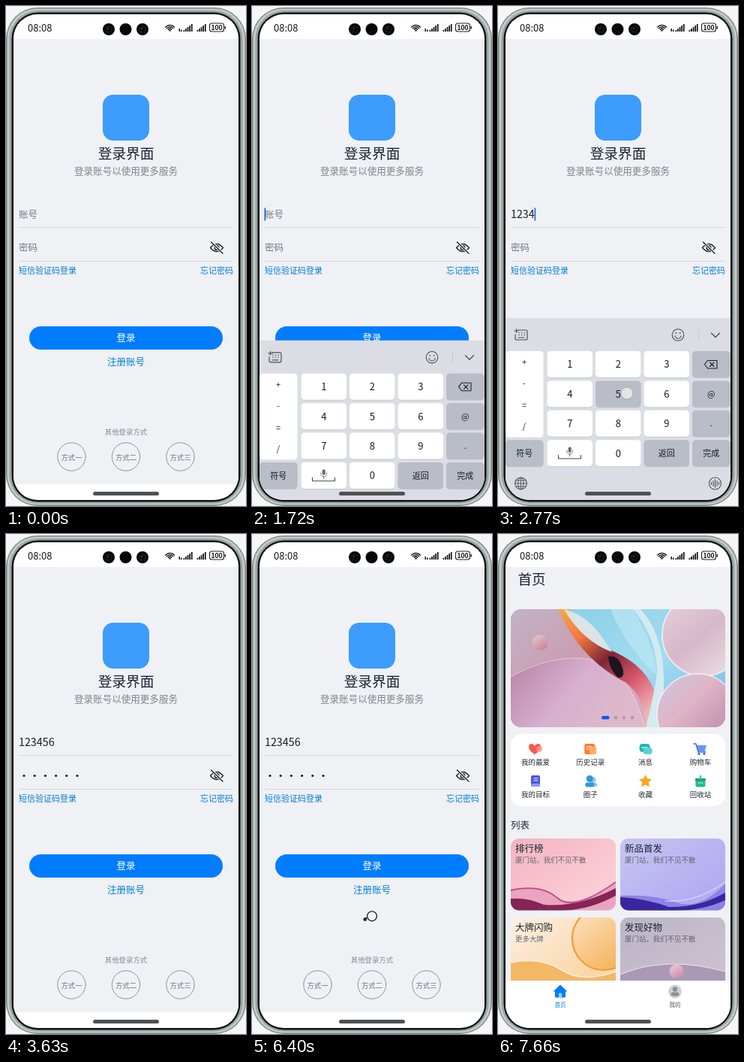
Write an HTML page with a canvas that moves like this. It is 320x665 px and loops after 8000 ms.

```html
<!DOCTYPE html>
<html lang="zh-CN">
<head>
<meta charset="utf-8">
<style>
html, body { margin: 0; width: 100%; height: 100%; overflow: hidden; background: #f5f5f7; }
canvas { display: block; width: 320px; height: 665px; }
</style>
</head>
<body>
<canvas id="stage"></canvas>
<script>
const canvas = document.getElementById('stage');
const ctx = canvas.getContext('2d');
const dpr = window.devicePixelRatio || 1;
canvas.width = 320 * dpr;
canvas.height = 665 * dpr;

const LOOP = 8000;
const FONT = '"Noto Sans CJK SC", "Noto Sans SC", "Noto Sans CJK JP", "Noto Sans", sans-serif';
const PAGE = '#eff1f5', INK = '#182431', BLUE = '#007dff', KEY_GREY = '#b9bdc7';
const TAU = Math.PI * 2;

const clamp01 = v => Math.min(1, Math.max(0, v));
const easeOut = p => 1 - (1 - p) ** 3;

function text(str, x, y, size, color = INK, { align = 'left', weight = 400 } = {}) {
  ctx.font = `${weight} ${size}px ${FONT}`;
  ctx.textAlign = align;
  ctx.textBaseline = 'alphabetic';
  ctx.fillStyle = color;
  ctx.fillText(str, x, y + size * 0.375);
}
const centered = (str, x, y, size, color, weight) => text(str, x, y, size, color, { align: 'center', weight });

function box(x, y, w, h, r, fill) {
  ctx.beginPath();
  ctx.roundRect(x, y, w, h, r);
  ctx.fillStyle = fill;
  ctx.fill();
}
function disc(x, y, r, fill) {
  ctx.beginPath();
  ctx.arc(x, y, r, 0, TAU);
  ctx.fillStyle = fill;
  ctx.fill();
}
function ring(x, y, r, color, width = 1, from = 0, to = TAU) {
  ctx.beginPath();
  ctx.arc(x, y, r, from, to);
  ctx.strokeStyle = color;
  ctx.lineWidth = width;
  ctx.stroke();
}
function stroke(path, color, width = 1) {
  ctx.strokeStyle = color;
  ctx.lineWidth = width;
  ctx.stroke(new Path2D(path));
}
function shape(path, fill) {
  ctx.fillStyle = fill;
  ctx.fill(new Path2D(path));
}
function linear(x0, y0, x1, y1, ...colors) {
  const g = ctx.createLinearGradient(x0, y0, x1, y1);
  colors.forEach((c, i) => g.addColorStop(i / (colors.length - 1), c));
  return g;
}
function clipped(x, y, w, h, r, draw) {
  ctx.save();
  ctx.beginPath();
  ctx.roundRect(x, y, w, h, r);
  ctx.clip();
  draw();
  ctx.restore();
}

function phoneBody() {
  ctx.fillStyle = '#f5f5f7';
  ctx.fillRect(0, 0, 320, 665);
  box(0, 2, 320, 663, 42, '#7d8988');
  box(1.5, 3.5, 317, 660, 40, '#c0cbca');
  box(4.5, 6, 311, 655.5, 38, '#98a4a3');
  box(7.5, 8.5, 305, 651, 35, '#111415');
}

function statusBar() {
  text('08:08', 29, 29, 13, '#111', { weight: 500 });
  for (const x of [137, 159.5, 182]) disc(x, 31, 8, '#050608');
  for (const x of [137, 182]) {
    ring(x, 31, 4, '#22282e', 1);
    disc(x - 1, 30, 1.1, '#3c4a58');
  }
  for (const r of [2.8, 5.2, 7.6]) ring(218.5, 33, r, '#111', 1.4, -Math.PI * 0.78, -Math.PI * 0.22);
  disc(218.5, 32.6, 1.2, '#111');
  ctx.fillStyle = '#111';
  ctx.fillRect(230.5, 30, 1.5, 4);
  ctx.fillRect(233, 31.5, 1.5, 2.5);
  for (let i = 0; i < 5; i++) {
    const h = 2 + i * 2;
    ctx.fillRect(236.5 + i * 2.6, 34 - h, 1.7, h);
    ctx.fillRect(254.5 + i * 2.6, 34 - h, 1.7, h);
  }
  ctx.beginPath();
  ctx.roundRect(271.5, 23, 19, 11, 3);
  ctx.strokeStyle = '#222';
  ctx.lineWidth = 1.1;
  ctx.stroke();
  ctx.fillStyle = '#222';
  ctx.fillRect(291.5, 27, 1.5, 3.5);
  centered('100', 281, 28.6, 8.6, '#111', 700);
}

function eyeIcon() {
  stroke('M272.5 321.5Q281 311.5 289.5 321.5Q281 331.5 272.5 321.5Z', '#222', 1.3);
  ring(281, 321.5, 2.8, '#222', 1.5);
  stroke('M274.5 314.5L288.5 328.5', PAGE, 3.4);
  stroke('M273.5 314L289 329', '#222', 1.4);
}

function caret(x) {
  ctx.fillStyle = '#1668e3';
  ctx.fillRect(x, 268.5, 1.7, 17);
}

function touchDot(x, y) {
  disc(x, y, 8, 'rgba(235,235,238,.85)');
  ring(x, y, 8, 'rgba(125,128,135,.6)', 0.8);
}

function loader(t) {
  const cx = 160, cy = 508.3, tilt = -0.43;
  const phase = (t - 6400) / 1200;
  const comet = front => {
    for (let i = 16; i >= 0; i--) {
      const a = TAU * (phase - i * 0.008);
      if ((Math.sin(a) >= 0) !== front) continue;
      const u = -Math.cos(a) * 10.2, v = Math.sin(a) * 1.2;
      disc(cx + u * Math.cos(tilt) - v * Math.sin(tilt),
           cy + u * Math.sin(tilt) + v * Math.cos(tilt), 2.2 - i * 0.1, '#2c2e31');
    }
  };
  comet(false);
  disc(cx, cy, 6.4, PAGE);
  ring(cx, cy, 6.4, '#2c2e31', 1.4);
  comet(true);
}

function loginPage(t) {
  const typed = '123456'.slice(0, Math.max(0, Math.floor((t - 2240) / 130)));
  const hasPassword = t >= 3230;

  box(129, 118, 62, 61, 14, '#3c9cfc');
  centered('登录界面', 160, 195.5, 18.7, INK, 500);
  centered('登录账号以使用更多服务', 160, 219.5, 12.55, '#7f848b');

  if (typed) text(typed, 17, 277, 14.3, '#171c22');
  else text('账号', 17, 277, 12.5, '#74787e');
  if (t >= 1700 && t < 3230) caret(typed ? 17 + typed.length * 7.95 - 0.3 : 16.5);

  ctx.fillStyle = '#d4d7db';
  ctx.fillRect(17, 294, 286, 1);
  ctx.fillRect(17, 339, 286, 1);

  if (hasPassword) for (let i = 0; i < 6; i++) disc(24 + i * 14.2, 321.5, 1.6, '#171c22');
  else text('密码', 17, 321.5, 12.5, '#74787e');
  eyeIcon();

  text('短信验证码登录', 17, 352, 11, '#007dd9', { weight: 500 });
  text('忘记密码', 303, 352, 11, '#007dd9', { align: 'right', weight: 500 });

  const pressed = t >= 4290 && t < 4420;
  box(31, 426, 258, 31, 15.5, pressed ? '#0071e6' : BLUE);
  centered('登录', 160, 441.5, 12.5, '#fff', 500);
  centered('注册账号', 160, 473, 12.5, '#007dd9', 500);

  centered('其他登录方式', 160, 566, 9.4, '#85898f');
  ['一', '二', '三'].forEach((n, i) => {
    const x = 87.5 + i * 72.5;
    ring(x, 599.5, 18.7, '#85888c', 0.9);
    centered('方式' + n, x, 600, 9.4, '#6d7176');
  });

  if (t >= 4490) loader(t);
  if (t >= 1390 && t < 1520) touchDot(92, 277);
  if (pressed) touchDot(172, 444);
}

const columns = [10, 65.5, 130, 194.5, 259];
const rowY = row => 459 + row * 39.4;

function key(col, row, label, { grey = false, size = 13 } = {}) {
  const x = columns[col], w = col % 4 ? 60.5 : 50.5, y = rowY(row);
  box(x, y + 1, w, 35, 4.5, '#c3c6ce');
  box(x, y, w, 35, 4.5, grey ? KEY_GREY : '#fff');
  if (label) centered(label, x + w / 2, y + 17.5, size, '#15181c', 500);
}

function keyboardIcons() {
  const c = '#4b4f56';
  stroke('M27 431H37Q39 431 39 433V442Q39 444 37 444H25Q23 444 23 442V437M22 432H27M24.5 429.5V434.5', c, 1.2);
  for (let i = 0; i < 6; i++) disc(28 + (i % 3) * 3.6, 434.5 + Math.floor(i / 3) * 3, 0.8, c);
  stroke('M27 441H35', c, 1.2);
  ring(240, 437.5, 7.8, c, 1.1);
  ring(240, 438, 4.2, c, 1.1, 0.2, Math.PI - 0.2);
  disc(237.3, 435, 0.9, c);
  disc(242.7, 435, 0.9, c);
  stroke('M267.5 430V445', '#c6c9d0', 1);
  stroke('M284.5 435L290 440.5L295.5 435', c, 1.3);

  stroke('M275.5 476.5L279.5 471.5H292V482H279.5ZM282.5 474L288 479.5M288 474L282.5 479.5', '#1d2024', 1.1);
  box(93.7, 586.5, 4, 7.5, 2, '#65696f');
  stroke('M91.7 591Q92 596 95.7 596Q99.4 596 99.7 591M95.7 596V599', '#65696f', 0.9);
  stroke('M80.5 597.5V602H110.5V597.5', '#44484e', 1.1);

  ring(30.5, 635, 7.8, c, 1.1);
  stroke('M22.7 635H38.3M24 631H37M24 639H37M30.5 627V643', c, 0.9);
  ctx.beginPath();
  ctx.ellipse(30.5, 635, 3.7, 7.8, 0, 0, TAU);
  ctx.stroke();
  ring(289.5, 635, 8, c, 1.1);
  stroke('M284.5 633.5V636.5M287 631.5V638.5M289.5 629.5V640.5M292 631.5V638.5M294.5 633.5V636.5', c, 1.1);
}

function keyboard(t) {
  const shown = easeOut(clamp01((t - 1520) / 400));
  const hidden = clamp01((t - 3230) / 350) ** 1.5;
  const offset = 242 * (1 - shown + hidden);
  if (offset >= 242) return;
  const beat = (t - 2240) / 130;
  const active = beat >= 0 && beat < 6 && beat % 1 < 0.85 ? Math.floor(beat) + 1 : 0;

  ctx.save();
  ctx.translate(0, offset);
  ctx.fillStyle = '#dcdde4';
  ctx.fillRect(10, 415, 300, 250);
  box(10, 459, 50.5, 114.5, 4.5, '#fff');
  ['+', '-', '=', '/'].forEach((s, i) => centered(s, 35, 474 + i * 28.3, 11, '#15181c', 500));
  for (let n = 1; n <= 9; n++) {
    key(1 + (n - 1) % 3, Math.floor((n - 1) / 3), String(n), { grey: n === active });
  }
  ['', '@', '.'].forEach((s, row) => key(4, row, s, { grey: true, size: 11 }));
  key(0, 3, '符号', { grey: true, size: 11 });
  key(1, 3, '');
  key(2, 3, '0');
  key(3, 3, '返回', { grey: true, size: 11 });
  key(4, 3, '完成', { grey: true, size: 11 });
  keyboardIcons();
  if (active) touchDot(columns[1 + (active - 1) % 3] + 42, rowY(Math.floor((active - 1) / 3)) + 16.5);
  ctx.restore();
}

function banner() {
  clipped(17, 100, 286, 157, 14, () => {
    ctx.fillStyle = linear(140, 100, 260, 257, '#8fd3ea', '#a4dcf0', '#79bfe4');
    ctx.fillRect(17, 100, 286, 157);
    shape('M17 100H86Q110 150 165 178Q215 205 212 257H17Z', linear(17, 100, 150, 257, '#c3b3c5', '#cb9db3', '#d5a9c3'));
    shape('M17 190Q70 160 120 166Q175 176 196 257H17Z', linear(40, 165, 150, 257, '#bd8cad', '#d6b0cf', '#dfb9c9'));
    stroke('M17 190Q70 160 120 166Q175 176 196 257', 'rgba(255,235,245,.5)', 1);
    shape('M80 100H96Q118 142 158 158Q200 178 210 214Q206 236 196 257Q196 208 160 192Q106 160 80 100Z',
      linear(85, 100, 200, 235, '#f7a74c', '#f2773f', '#7c2634', '#d8576d', '#efb4b5'));
    shape('M147 163Q160 160 166 178Q170 192 160 191Q148 180 147 163Z', '#1e1420');
    shape('M88 100Q114 106 135 132Q146 148 152 157Q112 142 88 100Z', '#dbe4e7');
    shape('M150 100H180Q208 146 212 188Q170 150 150 100Z', 'rgba(190,232,244,.65)');
    shape('M180 100Q213 140 212 186Q206 224 197 257H214Q226 205 218 160Q210 120 190 100Z', '#d3eaf1');
    disc(274, 134, 55, linear(225, 95, 300, 190, '#e3cdd8', '#d7b8c8', '#eadbe0'));
    ring(274, 134, 55, 'rgba(255,255,255,.75)', 1.5);
    disc(266, 240, 54, linear(225, 190, 290, 257, '#cfc3dc', '#dfb5c6', '#c797b4'));
    ring(266, 240, 54, 'rgba(255,245,250,.8)', 1.5);
    disc(56, 144.5, 10.5, linear(48, 135, 62, 156, '#e7c5cf', '#c68093'));
  });
  box(138, 242, 10.5, 4.5, 2.3, '#0a59f7');
  for (const x of [157, 168, 179]) disc(x, 244.3, 2.3, 'rgba(90,95,115,.35)');
}

const icons = [
  (x, y) => {
    shape(`M${x - 1} ${y + 7}C${x - 16} ${y - 2} ${x - 6} ${y - 12} ${x - 1} ${y - 4}C${x + 5} ${y - 12} ${x + 14} ${y - 2} ${x - 1} ${y + 7}Z`, '#fa5a50');
    disc(x + 5, y, 4, 'rgba(255,150,135,.8)');
  },
  (x, y) => {
    box(x - 8, y - 7, 14, 14, 2.5, '#fb7d37');
    box(x - 1, y - 3, 9, 10, 2, '#ffad6b');
    stroke(`M${x - 5} ${y - 3}H${x + 1}M${x - 5} ${y}H${x - 2}`, '#fff', 1.2);
  },
  (x, y) => {
    box(x - 8, y - 7, 14, 11, 4, '#25b6bd');
    box(x - 3, y - 2, 12, 9, 4, '#5fd0d2');
    stroke(`M${x - 5} ${y - 2}H${x + 2}`, '#fff', 1.1);
  },
  (x, y) => {
    shape(`M${x - 5} ${y - 5}H${x + 8}L${x + 6} ${y + 3}H${x - 3}Z`, '#6c95f5');
    stroke(`M${x - 9} ${y - 7}H${x - 6}L${x - 3} ${y + 4}H${x + 7}`, '#4268e0', 1.4);
    disc(x - 2, y + 6.5, 1.6, '#4268e0');
    disc(x + 5, y + 6.5, 1.6, '#4268e0');
  },
  (x, y) => {
    box(x - 6, y - 8, 12, 15, 2, '#4a55e4');
    box(x - 6, y + 3, 12, 4, 2, '#8f97f7');
    stroke(`M${x - 2} ${y - 4}H${x + 3}M${x - 2} ${y - 1}H${x + 3}`, '#fff', 1.2);
  },
  (x, y) => {
    disc(x + 3, y - 2, 4, '#8cc8ee');
    box(x - 1, y + 2, 10, 5, 2.5, '#8cc8ee');
    disc(x - 1, y - 3.5, 4.5, '#2f97dc');
    box(x - 7, y + 1.5, 12, 6, 3, '#2f97dc');
  },
  (x, y) => {
    ctx.beginPath();
    for (let i = 0; i < 10; i++) {
      const a = i * TAU / 10 - Math.PI / 2, r = i % 2 ? 4.4 : 9;
      ctx.lineTo(x + r * Math.cos(a), y + r * Math.sin(a));
    }
    ctx.closePath();
    ctx.fillStyle = '#fba614';
    ctx.fill();
  },
  (x, y) => {
    box(x - 6.5, y - 2, 13, 9.5, 2, '#27ba90');
    box(x - 7, y - 4, 14, 3.5, 1, '#1a9d79');
    box(x - 1.2, y - 8, 2.4, 6, 1, '#35c99f');
    stroke(`M${x - 3} ${y + 2}H${x + 3}`, '#c9f4e5', 1.2);
  }
];
const labels = ['我的最爱', '历史记录', '消息', '购物车', '我的目标', '圈子', '收藏', '回收站'];

function menu() {
  box(17, 266, 286, 96, 15, '#fff');
  labels.forEach((label, i) => {
    const x = 50 + (i % 4) * 73.3, y = i < 4 ? 286 : 329;
    icons[i](x, y);
    centered(label, x, y + 17, 9.5, '#22272e');
  });
}

const art = [
  (x, y) => {
    shape(`M${x} ${y + 67}Q${x + 40} ${y + 60} ${x + 62} ${y + 78}T${x + 140} ${y + 58}V${y + 96}H${x}Z`, '#e9a5c0');
    shape(`M${x} ${y + 80}Q${x + 22} ${y + 78} ${x + 44} ${y + 88}Q${x + 90} ${y + 92} ${x + 140} ${y + 66}V${y + 76}Q${x + 100} ${y + 98} ${x + 55} ${y + 96}H${x}Z`, '#862456');
    stroke(`M${x} ${y + 69}Q${x + 40} ${y + 60} ${x + 62} ${y + 79}T${x + 140} ${y + 58}`, '#c24a85', 1.8);
  },
  (x, y) => {
    shape(`M${x} ${y + 76}Q${x + 45} ${y + 74} ${x + 75} ${y + 85}T${x + 140} ${y + 60}V${y + 96}H${x}Z`, '#8f82e6');
    shape(`M${x} ${y + 78}Q${x + 35} ${y + 80} ${x + 65} ${y + 91}Q${x + 105} ${y + 92} ${x + 140} ${y + 72}V${y + 82}Q${x + 110} ${y + 96} ${x + 70} ${y + 96}H${x}Z`, '#3a269f');
    stroke(`M${x + 60} ${y + 83}Q${x + 100} ${y + 86} ${x + 140} ${y + 58}`, '#d8d2ff', 1.2);
  },
  (x, y) => {
    disc(x + 124, y + 28, 42, linear(x + 85, y, x + 140, y + 70, '#fbe0bc', '#f5b25a'));
    ring(x + 124, y + 28, 42, '#ef9d37', 2.2);
    shape(`M${x} ${y + 60}Q${x + 40} ${y + 52} ${x + 68} ${y + 70}T${x + 140} ${y + 72}V${y + 96}H${x}Z`, '#f4b766');
    stroke(`M${x} ${y + 60}Q${x + 40} ${y + 52} ${x + 68} ${y + 70}T${x + 140} ${y + 72}`, '#fff0d5', 1.5);
  },
  (x, y) => {
    shape(`M${x} ${y + 76}Q${x + 60} ${y + 50} ${x + 140} ${y + 72}V${y + 96}H${x}Z`, '#a999b4');
    stroke(`M${x} ${y + 76}Q${x + 60} ${y + 50} ${x + 140} ${y + 72}`, '#e5d9e4', 1.2);
    disc(x + 75, y + 72, 9.5, linear(x + 68, y + 62, x + 80, y + 82, '#f0cdd9', '#c58aa4'));
  }
];
const cards = [
  ['排行榜', '厦门站，我们不见不散', '#f3b3c3', '#fbccd3'],
  ['新品首发', '厦门站，我们不见不散', '#c6c4f3', '#b4aef0'],
  ['大牌闪购', '更多大牌', '#fdf0e4', '#f9d7ab'],
  ['发现好物', '厦门站，我们不见不散', '#bbb5c6', '#c9bfce']
];

function cardGrid() {
  cards.forEach(([title, note, from, to], i) => {
    const x = 17 + (i % 2) * 146, y = i < 2 ? 405 : 510;
    clipped(x, y, 140, 95.5, 11, () => {
      ctx.fillStyle = linear(x, y, x + 70, y + 95, from, to);
      ctx.fillRect(x, y, 140, 96);
      art[i](x, y);
    });
    text(title, x + 6, y + 13, 12.5, INK, { weight: 500 });
    text(note, x + 6, y + 28.5, 9.45, '#62656f');
  });
}

function tabBar() {
  ctx.fillStyle = '#fff';
  ctx.fillRect(10, 594, 300, 70);
  shape('M83 599.5L92.5 608.5H90V615Q90 616.5 88.5 616.5H77.5Q76 616.5 76 615V608.5H73.5Z', BLUE);
  box(81, 610.5, 4, 6, 1, '#9ccfff');
  centered('首页', 83, 626, 7.6, BLUE, 500);
  disc(236, 608.5, 9, '#cfd2d6');
  disc(236, 605.5, 3.2, '#8d9197');
  box(230.5, 609.5, 11, 5, 2.5, '#8d9197');
  centered('我的', 236, 626, 7.6, '#53575d');
}

function homePage() {
  text('首页', 26.5, 60, 18.6, INK, { weight: 500 });
  banner();
  menu();
  text('列表', 17, 387.5, 12.5, INK, { weight: 500 });
  cardGrid();
  tabBar();
}

function render(t) {
  ctx.setTransform(dpr, 0, 0, dpr, 0, 0);
  ctx.lineCap = ctx.lineJoin = 'round';
  phoneBody();
  clipped(10, 11, 300, 646, 32, () => {
    ctx.fillStyle = '#fff';
    ctx.fillRect(10, 11, 300, 646);
    ctx.fillStyle = PAGE;
    ctx.fillRect(10, 44, 300, 592);
    if (t < 6730) {
      loginPage(t);
      keyboard(t);
    } else {
      homePage();
    }
    statusBar();
    box(116, 646, 88, 5, 2.5, '#4f5154');
  });
}

const start = performance.now();
function tick() {
  render((performance.now() - start) % LOOP);
  requestAnimationFrame(tick);
}
tick();
</script>
</body>
</html>
```
